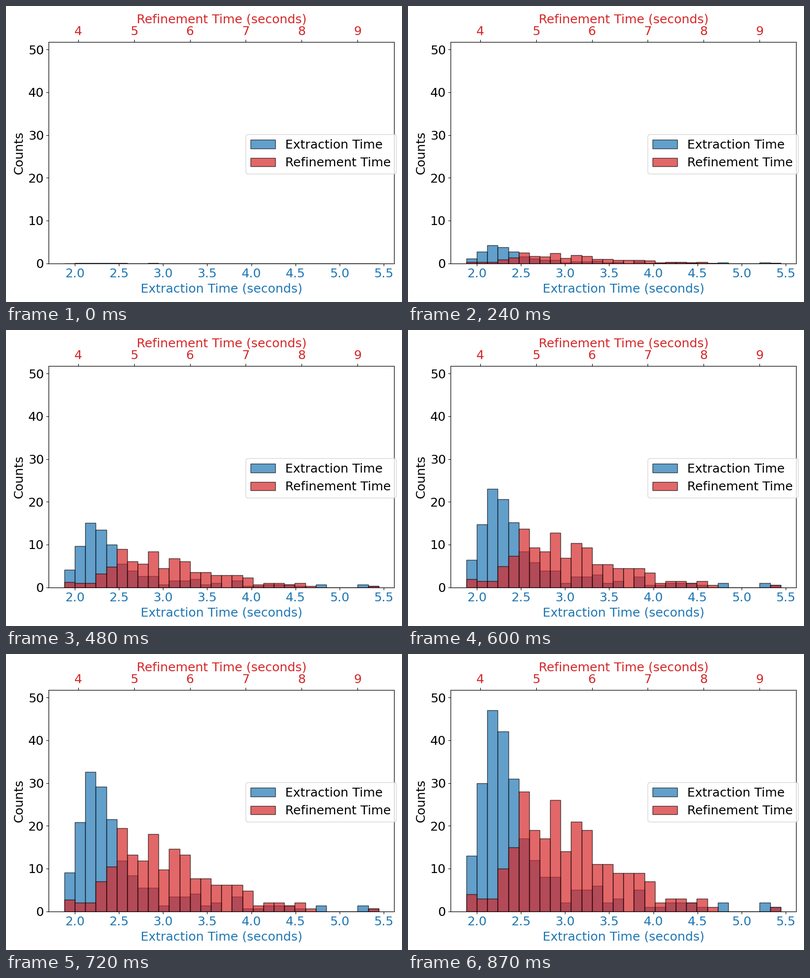
These frames come from a looping animation (800 px wide and 600 px high, 0.9 s). A matplotlib script:

```python
import numpy as np
import matplotlib.pyplot as plt
from matplotlib.animation import FuncAnimation

FRAMES = 30
SIZE = 18

extraction = [13, 30, 47, 42, 31, 17, 12, 8, 8, 2, 5, 5, 6, 2, 3,
              0, 5, 1, 1, 2, 2, 2, 1, 0, 2, 0, 0, 0, 2, 1]
refinement = [4, 3, 3, 10, 15, 28, 19, 17, 26, 14, 21, 19, 11, 11, 9,
              9, 9, 7, 2, 3, 3, 2, 3, 1, 0, 0, 0, 0, 0, 1]


def draw_bars(ax, counts, start, end, color, name):
    """Draw a histogram with its own coloured x axis."""
    edges = np.linspace(start, end, len(counts) + 1)
    bars = ax.bar(edges[:-1], counts, np.diff(edges), align="edge",
                  color=color, edgecolor="black", alpha=0.7, label=name)
    margin = 0.05 * (end - start)
    ax.set_xlim(start - margin, end + margin)
    ax.set_xlabel(f"{name} (seconds)", color=color, fontsize=SIZE)
    ax.tick_params(axis="x", labelcolor=color, labelsize=SIZE)
    return bars


fig, ax = plt.subplots(figsize=(8, 6), dpi=100)
top_ax = ax.twiny()
blue = draw_bars(ax, extraction, 1.881, 5.443, "tab:blue", "Extraction Time")
red = draw_bars(top_ax, refinement, 3.749, 9.379, "tab:red", "Refinement Time")

ax.set_ylim(0, 1.1 * max(extraction))
ax.set_ylabel("Counts", fontsize=SIZE)
ax.tick_params(axis="y", labelsize=SIZE)
fig.tight_layout()
fig.legend(loc="center right", fontsize=SIZE)


def update(frame):
    growth = ((frame + 1) / FRAMES) ** 2
    for bars, counts in ((blue, extraction), (red, refinement)):
        for bar, count in zip(bars, counts):
            bar.set_height(count * growth)
    return [*blue, *red]


anim = FuncAnimation(fig, update, frames=FRAMES, interval=30,
                     repeat=True, repeat_delay=0)
plt.show()
```
